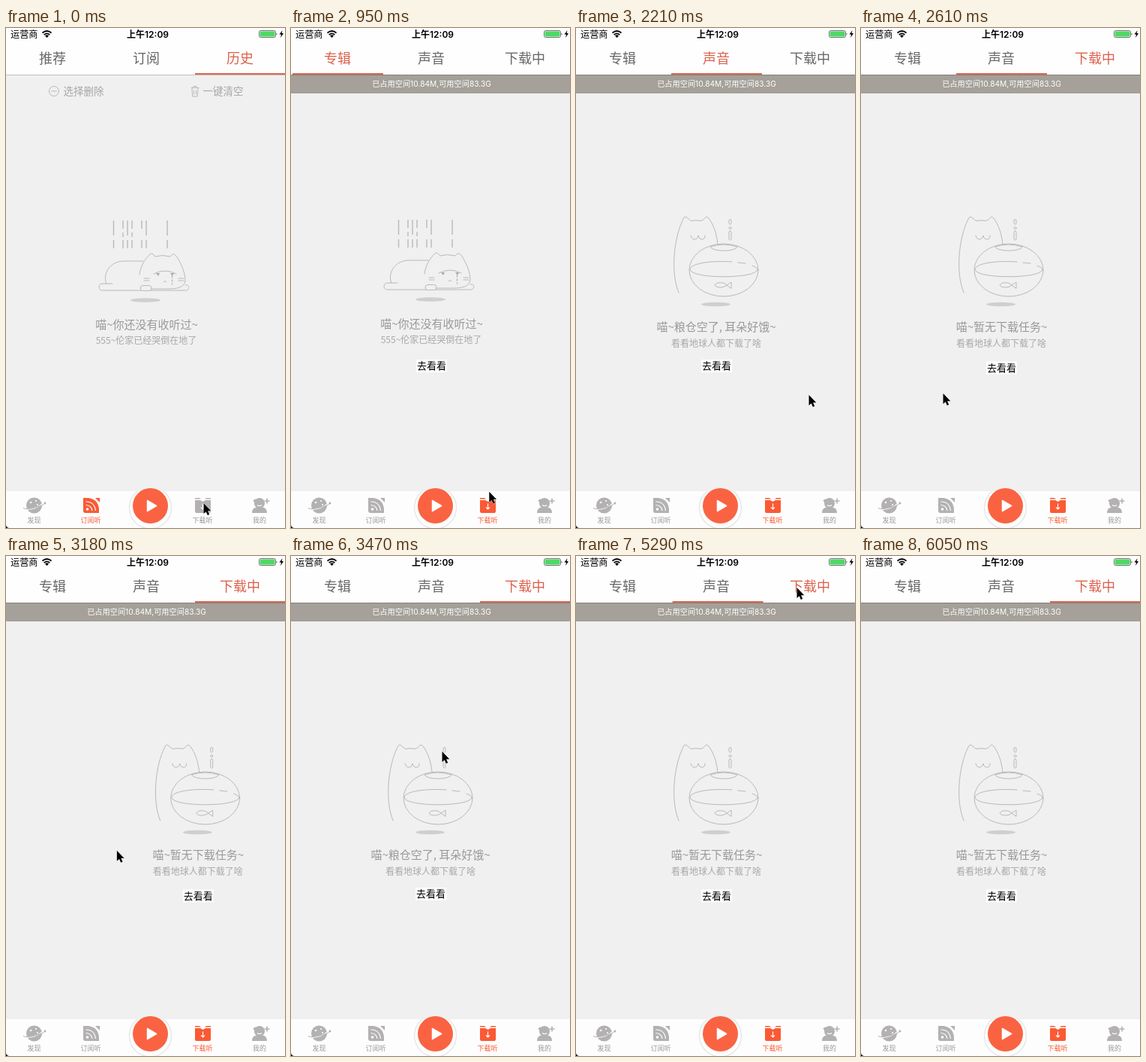
Recreate the animation shown at these times as an HTML page. Size 372 by 665 pixels, loop 6460 ms.

```html
<!DOCTYPE html>
<html lang="zh-CN">
<head>
<meta charset="utf-8">
<style>
html, body { margin: 0; width: 100%; height: 100%; overflow: hidden; background: #f0f0f0; }
svg { display: block; width: 372px; height: 665px; font-family: Inter, "Noto Sans CJK SC", "Noto Sans CJK", sans-serif; }
.mid { text-anchor: middle; }
.title { font-size: 18px; fill: #666; }
.title.on { fill: #dc604a; }
.head, .sub, .tool { font-family: "Noto Sans CJK SC", "Noto Sans CJK", sans-serif; font-weight: 300; }
.head { font-size: 15px; fill: #999; }
.sub { font-size: 12px; fill: #a8a8a8; }
.tool { font-size: 13.5px; fill: #a6a6a6; }
.label { font-size: 9px; }
.line { fill: none; stroke: #b9b9b9; stroke-linecap: round; stroke-linejoin: round; }
.rain { stroke-width: 1.4; stroke-linecap: butt; }
.tab { color: #b3b1b1; }
.tab text { fill: #999; }
.tab.on { color: #fa5a34; }
.tab.on text { fill: #fa5a34; }
.solid { fill: currentColor; }
.cut { fill: none; stroke: #fff; stroke-width: 1.2; }
</style>
</head>
<body>
<svg viewBox="0 0 372 665">
  <defs>
    <g id="lying">
      <g class="line">
        <g class="rain">
          <path stroke-dasharray="20 6 11" d="M143.500 256v37M162 256v37M187 256v37M215 256v37"/>
          <path stroke-dasharray="11 5 6 4 11" d="M156 256v37M168 256v37"/>
          <path stroke-dasharray="11 15 11" d="M181 256v37"/>
        </g>
        <path d="M134 340C128 327 139 310 157 310H183M142 340H128.500A4.500 4.500 0 0 0 128.500 349H239C246 349 245 340 239 342"/>
        <path d="M178 328C179 317 186 306 192 301Q194 298 199 304Q208 301 219 304L222 301Q225 299 230 308C237 320 239 330 239 336C238 345 228 347 216 347H194"/>
        <path d="M197 327Q212 319 227 327M184 333h7M184 336h7M230 333h7M230 336h7M210 338q2-3 4 0"/>
        <path stroke-dasharray="2 3" stroke-width="1.500" d="M221.500 330v11"/>
        <rect x="179" y="342.500" width="15" height="7" rx="3.500" fill="#f0f0f0"/>
      </g>
      <path fill="#aaa" d="M200 326h5l-2 4zM219 326h5l-2 4z"/>
      <ellipse cx="186" cy="362" rx="20" ry="2.800" fill="#cfcfcf"/>
      <g class="mid">
        <text class="head" x="187.500" y="400">喵~你还没有收听过~</text>
        <text class="sub" x="187" y="420">555~伦家已经哭倒在地了</text>
      </g>
    </g>
    <g id="bowl">
      <g class="line">
        <path d="M137 352C126 326 130 280 143 254Q145 249 149 253Q152 256 154 256.500Q160 255 166 256.500Q170 256 172 252.500Q175 249 179 256C186 267 188 279 189 288"/>
        <path d="M153 276q1 5 5 5t5-5q1 5 5 5t4-5"/>
        <ellipse cx="197" cy="322" rx="46" ry="35"/>
        <path d="M179 291C181 298 213 298 215 291M179 291Q196 285 215 291"/>
        <path d="M208 311C180 309 153 313 152 321C153 334 241 334 242 321Q241 318 235 316M216 312l10 1"/>
        <path d="M201 342c-4-5-14-4-16 0c2 4 12 4 16 0l6-4v8z"/>
        <rect x="204" y="254.500" width="3" height="6.500" rx="1.500"/>
        <circle cx="205.500" cy="266" r="1.500"/>
        <rect x="204" y="270" width="3" height="12" rx="1.500"/>
      </g>
      <ellipse cx="186.500" cy="367.500" rx="19.500" ry="2.800" fill="#cfcfcf"/>
      <text class="sub mid" x="187" y="423.500">看看地球人都下载了啥</text>
    </g>
    <g id="button">
      <rect x="167" y="441" width="41" height="17" fill="#fff"/>
      <text class="mid" x="187.500" y="454" font-size="13">去看看</text>
    </g>
    <clipPath id="bar"><path d="M0 616H372V665H0z"/></clipPath>
  </defs>

  <rect width="372" height="665" fill="#f0f0f0"/>

  <g id="history">
    <g class="line">
      <circle cx="64" cy="84" r="6.500"/>
      <path d="M60.500 84h7M247 79.500h10M250 79.500v-2h4v2M248 80l.7 11h6.600l.7-11M250.500 83v5M253.500 83v5"/>
    </g>
    <text class="tool" x="76.500" y="89">选择删除</text>
    <text class="tool" x="262.500" y="89">一键清空</text>
    <use href="#lying"/>
  </g>

  <g id="download">
    <g class="page"><use href="#lying" y="-1"/><use href="#button"/></g>
    <g class="page">
      <use href="#bowl"/><use href="#button"/>
      <text class="head mid" x="187" y="403">喵~粮仓空了, 耳朵好饿~</text>
    </g>
    <g class="page">
      <use href="#bowl"/><use href="#button" y="2.500"/>
      <text class="head mid" x="187.500" y="403">喵~暂无下载任务~</text>
    </g>
    <rect y="62" width="372" height="25" fill="#a5a099"/>
    <text class="mid" x="187.500" y="78" font-size="10.200" fill="#fff">已占用空间10.84M,可用空间83.3G</text>
  </g>

  <rect width="372" height="62" fill="#fefefe"/>
  <rect y="62" width="372" height="1" fill="#000" opacity=".2"/>
  <text x="6" y="12.500" font-size="12.200">运营商</text>
  <path d="M48.500 6.500Q54.500 1.500 60.500 6.500M50.700 9Q54.500 5.800 58.300 9" fill="none" stroke="#000" stroke-width="1.700"/>
  <path d="M52 10.300q2.500-2 5 0l-2.500 2.600z"/>
  <text class="mid" x="189" y="12.500" font-size="12" font-weight="600">上午12:09</text>
  <rect x="337.500" y="3.500" width="22" height="9" rx="2" fill="#fff" stroke="#555" stroke-width=".8"/>
  <rect x="338.500" y="4.500" width="20" height="7" rx="1" fill="#4cd964"/>
  <path d="M360.500 6.500q2 1.500 0 3z" fill="#555"/>
  <path d="M368.500 3l-4 5.500h2.500l-1 4.500 4-6h-2.500z"/>
  <g class="mid">
    <text class="title" x="62" y="46.500"></text>
    <text class="title" x="187" y="46.500"></text>
    <text class="title" x="312" y="46.500"></text>
  </g>
  <rect id="underline" y="60" width="121" height="2" fill="#dc694f"/>

  <rect y="616" width="372" height="49" fill="#fdfdfd"/>
  <circle cx="192.500" cy="638" r="28" fill="#fdfdfd" stroke="#e8e8e8" stroke-width="1.500" clip-path="url(#bar)"/>
  <circle cx="192.500" cy="635.500" r="23.500" fill="#fa6342"/>
  <path d="M188.500 628.500L200.500 635.500L188.500 642.500z" fill="#fff" stroke="#fff" stroke-width="1.500" stroke-linejoin="round"/>
  <g class="mid label">
    <g class="tab">
      <circle class="solid" cx="37.500" cy="635" r="10.500"/>
      <path class="cut" d="M24 640Q38 642 51 631"/>
      <path d="M23 638Q24 641 36 638.500T52 632" fill="none" stroke="currentColor"/>
      <circle class="solid" cx="52" cy="632" r="1.400"/>
      <g fill="#fff"><circle cx="33" cy="631" r="1.300"/><circle cx="40" cy="629" r="1.100"/><circle cx="42" cy="634" r="1"/></g>
      <text x="37.500" y="658">发现</text>
    </g>
    <g class="tab" id="subscribe">
      <path class="solid" d="M103 625H110Q123 627 124 640V645H106Q103 645 103 642zM119 625H125V631z"/>
      <path class="cut" d="M106.500 630Q118 630 119.500 642M106.500 634.500Q114 635 115 642"/>
      <circle cx="108.500" cy="640" r="1.800" fill="#fff"/>
      <text x="113" y="658">订阅听</text>
    </g>
    <g class="tab" id="save">
      <path class="solid" d="M252 628H259L262.500 630L266 628H273V643Q273 645 271 645H254Q252 645 252 643zM252 625H258L260 626.500H252zM267 625H273V626.500H265z"/>
      <path class="cut" d="M262.500 632.500V639.500M260 637.500L262.500 640L265 637.500"/>
      <text x="262" y="658">下载听</text>
    </g>
    <g class="tab">
      <path class="solid" d="M328 645Q328 638 334 637.500H342Q348 638 348 645z"/>
      <circle class="solid" cx="338" cy="632" r="7"/>
      <path class="cut" d="M335 634.500Q338 637 341 634.500"/>
      <path class="solid" d="M329.500 628l4-2-2 6zM347.200 625.500h1.600v2.700h2.700v1.600h-2.700v2.700h-1.600v-2.700h-2.700v-1.600h2.700z"/>
      <text x="338" y="658">我的</text>
    </g>
  </g>
  <path d="M0 661Q.5 664.500 4 665H0z"/>
  <path id="cursor" d="M.5 0V14L3.700 11.200L5.800 16L8.200 15L6.100 10.200H10.300z" stroke="#fff" paint-order="stroke"/>
</svg>
<script>
const LOOP = 6460, OPEN = 290, WIDTH = 372, TAB = 125;
const SWIPE = 340, SLIDE = 240, LAG = 60;
const names = { history: ['推荐', '订阅', '历史'], download: ['专辑', '声音', '下载中'] };

// A swipe drags the pages and then updates the tabs; a tap switches page at once.
const visits = [
  { at: 1343, page: 1, swipe: true },
  { at: 2262, page: 2, swipe: true },
  { at: 3148, page: 1, swipe: true },
  { at: 4134, page: 0 },
  { at: 5170, page: 2 },
];
const glides = [
  { at: 890, ms: 300, x: 270, y: 490 },
  { at: 1240, ms: 220, x: 94, y: 488 },
  { at: 1800, ms: 400, x: 310, y: 488 },
  { at: 2262, ms: 240, x: 109, y: 486 },
  { at: 2950, ms: 520, x: 201, y: 260 },
  { at: 3480, ms: 400, x: 117, y: 38 },
  { at: 4770, ms: 380, x: 294, y: 42 },
  { at: 5410, ms: 600, x: 374, y: 668 },
];

const $ = id => document.getElementById(id);
const titles = [...document.querySelectorAll('.title')];
const pages = [...document.querySelectorAll('.page')];
const clamp = p => Math.min(1, Math.max(0, p));
const mix = (a, b, p) => a + (b - a) * p;
const smooth = p => (p = clamp(p), p * p * (3 - 2 * p));
const easeOut = p => 1 - (1 - clamp(p)) ** 2;
const move = (el, x, y = 0) => el.setAttribute('transform', `translate(${x} ${y})`);

function tabsAt(t) {
  if (t < OPEN) return { scroll: 0, active: 2, line: 2 };
  const s = { scroll: 0, active: 0, line: 0 };
  for (const { at, page, swipe } of visits) {
    if (t < at) break;
    const done = swipe ? at + SWIPE : at;
    s.scroll = mix(s.scroll, page, swipe ? easeOut((t - at) / SWIPE) : 1);
    if (t >= done) s.active = page;
    s.line = mix(s.line, page, smooth((t - done - (swipe ? LAG : 0)) / SLIDE));
  }
  return s;
}

function cursorAt(t) {
  let x = 263, y = 632;
  for (const g of glides) {
    const p = smooth((t - g.at) / g.ms);
    x = mix(x, g.x, p);
    y = mix(y, g.y, p);
  }
  return [x, y];
}

function draw(t) {
  const opened = t >= OPEN, { scroll, active, line } = tabsAt(t);
  $('history').style.display = opened ? 'none' : '';
  $('download').style.display = opened ? '' : 'none';
  $('subscribe').classList.toggle('on', !opened);
  $('save').classList.toggle('on', opened);
  titles.forEach((el, i) => {
    el.textContent = names[opened ? 'download' : 'history'][i];
    el.classList.toggle('on', i === active);
  });
  pages.forEach((el, i) => move(el, (i - scroll) * WIDTH));
  move($('underline'), 2 + line * TAB);
  move($('cursor'), ...cursorAt(t));
}

const begin = performance.now();
function tick() {
  draw((performance.now() - begin) % LOOP);
  requestAnimationFrame(tick);
}
tick();
</script>
</body>
</html>
```
